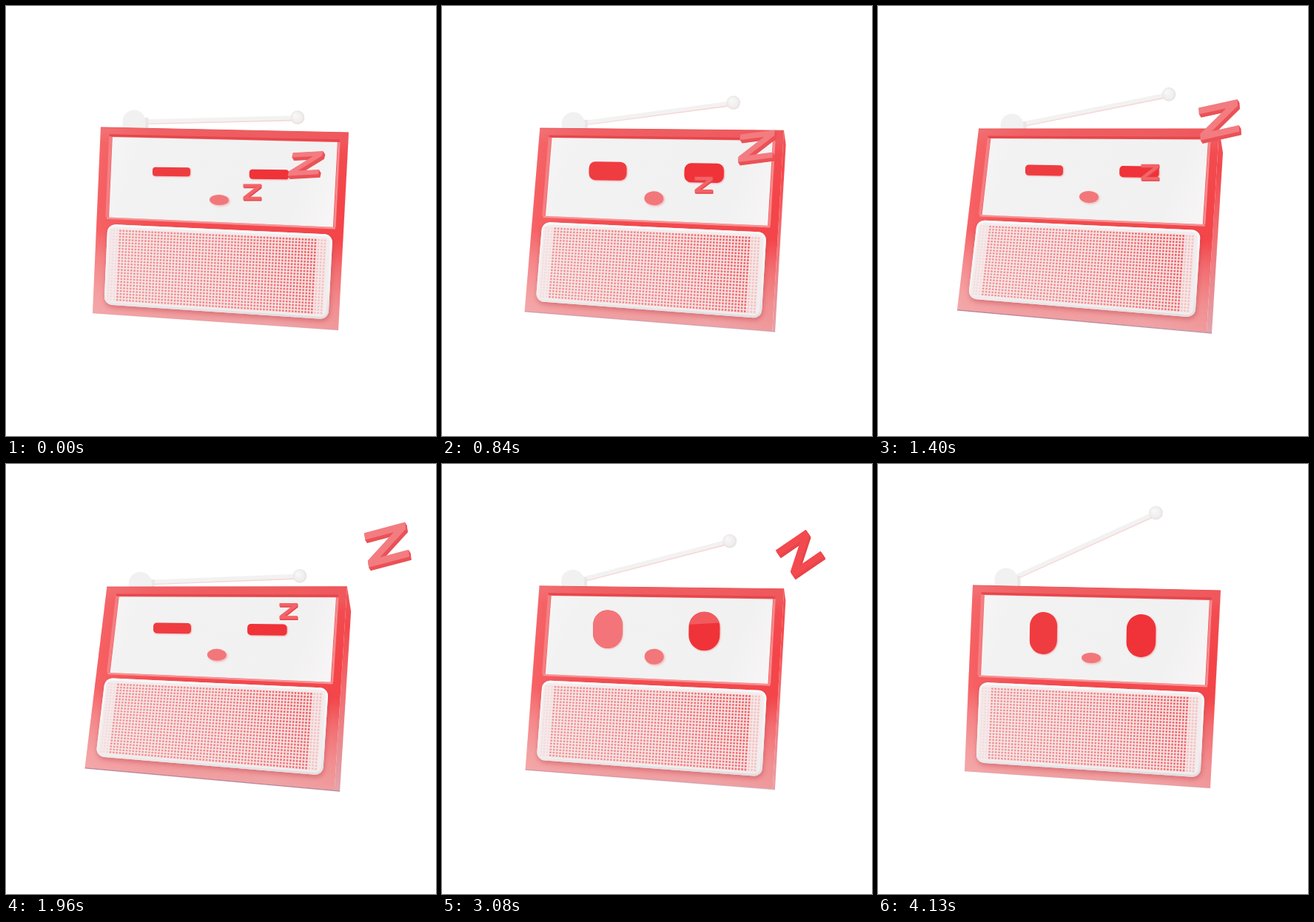
Write an HTML page with a canvas that moves like this. It is 581 by 581 pixels and loops after 4200 ms.

```html
<!DOCTYPE html>
<html lang="en">
<head>
<meta charset="utf-8">
<title>Sleepy radio</title>
<style>
html, body { margin: 0; width: 100%; height: 100%; overflow: hidden; background: #fff; }
canvas { display: block; width: 581px; height: 581px; }
</style>
</head>
<body>
<canvas id="stage" width="581" height="581"></canvas>
<script>
const ctx = document.getElementById('stage').getContext('2d');
const LOOP = 4200, STEP = 70, TURN = 1680;

// Eased key poses: [time, value].
const ANTENNA = [[0, 1.5], [1470, 11.5], [1960, 2.3], [2200, 2.3], [3850, 24.5]];
const OPEN = [[0, 0], [840, .29], [1400, .05], [1960, .05], [3430, 1]];
const NOSE = [[0, 14], [840, 19], [1400, 16], [1960, 16], [2800, 22], [4130, 14]];
const GLARE = [[2660, 0], [3010, 1], [3150, 1], [3430, 0]];

// Front corners TL, TR, BR, BL: at rest and turned.
const REST = [[128, 164], [463, 171], [449, 438], [117, 415]];
const TURNED = [[136, 166], [461, 166], [444, 441], [107, 411]];
const Z = [[0, 0], [1, 0], [1, .2], [.3, .8], [1, .8], [1, 1], [0, 1], [0, .8], [.7, .2], [0, .2]];

const mix = (a, b, k) => a + (b - a) * k;
const mixPoint = (a, b, k) => a.map((v, i) => mix(v, b[i], k));
const clamp = k => Math.max(0, Math.min(1, k));
const ease = k => Math.sin(clamp(k) * Math.PI / 2) ** 2;

function pose(keys, t) {
  let value = keys[0][1];
  for (let i = 1; i < keys.length; i++) {
    const [t0, a] = keys[i - 1], [t1, b] = keys[i];
    if (t >= t0) value = mix(a, b, ease((t - t0) / (t1 - t0)));
  }
  return value;
}

const sway = t => 1.08 * ease(t < TURN ? t / TURN : (LOOP - t) / (LOOP - TURN));

function point(q, u, v) {
  return mixPoint(mixPoint(q[0], q[1], u), mixPoint(q[3], q[2], u), v);
}

function inset(q, u0, v0, u1, v1) {
  return [point(q, u0, v0), point(q, u1, v0), point(q, u1, v1), point(q, u0, v1)];
}

function gradient(x0, y0, x1, y1, ...stops) {
  const g = ctx.createLinearGradient(x0, y0, x1, y1);
  stops.forEach(([k, c]) => g.addColorStop(k, c));
  return g;
}

function poly(pts, fill) {
  ctx.beginPath();
  pts.forEach(p => ctx.lineTo(...p));
  ctx.closePath();
  ctx.fillStyle = fill;
  ctx.fill();
}

function line(a, b, color, width) {
  ctx.beginPath();
  ctx.moveTo(...a);
  ctx.lineTo(...b);
  ctx.strokeStyle = color;
  ctx.lineWidth = width;
  ctx.stroke();
}

function roundQuad(q, r) {
  ctx.beginPath();
  ctx.moveTo(...point(q, .5, 0));
  for (let i = 1; i <= 4; i++) ctx.arcTo(...q[i % 4], ...q[(i + 1) % 4], r);
  ctx.closePath();
}

function shadow(color, blur, x, y) {
  ctx.shadowColor = color;
  ctx.shadowBlur = blur;
  ctx.shadowOffsetX = x;
  ctx.shadowOffsetY = y;
}

function antenna(t, s) {
  const angle = pose(ANTENNA, t) * Math.PI / 180;
  const kx = mix(173, 181, s), ky = mix(156, 161, s), reach = mix(205, 200, s);
  const x = kx + 16, y = mix(156, 159, s) - 5 * ease(t / LOOP) * (1 - s);
  const tx = x + reach * Math.cos(angle), ty = y - reach * Math.sin(angle);
  ctx.lineCap = 'round';
  line([x, y + 1], [tx, ty + 1.5], '#f7d6d6', 6);
  line([x, y], [tx, ty], '#f3f2f2', 5.5);
  ctx.lineCap = 'butt';
  ctx.fillStyle = '#ebe6e6';
  ctx.fillRect(kx + 10, ky - 5, 9.5, 15);
  ctx.fillStyle = '#f2f1f1';
  ctx.beginPath();
  ctx.arc(kx, ky, 15.5, Math.PI, 0);
  ctx.lineTo(kx + 15.5, 172);
  ctx.lineTo(kx - 15.5, 172);
  ctx.fill();
  const ball = ctx.createRadialGradient(tx - 3, ty - 3, 1, tx, ty, 9.5);
  ball.addColorStop(0, '#f8f8f8');
  ball.addColorStop(.7, '#f0eeee');
  ball.addColorStop(1, '#e8dfdf');
  ctx.fillStyle = ball;
  ctx.beginPath();
  ctx.arc(tx, ty, 9.3, 0, 7);
  ctx.fill();
}

function body(q, s) {
  const [, [rx, ry], [bx, by]] = q;
  const corner = [bx + 7 * s, by + s];
  poly([q[1], [rx + 5 * s, ry + 3 + 29 * s], corner, q[2]],
    gradient(0, 165, 0, 442, [0, '#f0575b'], [.2, '#f3484d'], [.55, '#f07276'], [1, '#e4a4ab']));
  poly(q, gradient(0, 164, -12, 440, [0, '#ef5d61'], [.06, '#f24f53'], [.3, '#f4474b'],
    [.48, '#f4494d'], [.62, '#f27477'], [.8, '#f1989a'], [1, '#eeadaf']));
  poly(q, gradient(112, 0, 460, 0, [0, 'rgba(255,190,190,.25)'], [.25, 'rgba(255,150,150,.08)'],
    [.7, 'rgba(245,40,45,0)'], [1, 'rgba(245,40,45,.1)']));
  line(q[0], q[1], '#e9575b', 1);
  line(q[3], corner, `rgba(150,95,130,${clamp(.15 + s * .5)})`, 1.2);
}

function screen(q, s) {
  const f = inset(q, .049 + .006 * s, .05 + .003 * s, .957, .481 - .01 * s);
  line(point(f, -.009, -.02), point(f, -.009, 1), '#f47f82', 4);
  line(point(f, -.014, -.02), point(f, 1.01, -.02), '#e5474c', 3);
  line(point(f, 1.007, 0), point(f, 1.007, 1), '#f58a8d', 3);
  line(point(f, -.01, 1.012), point(f, 1.01, 1.012), '#f69194', 2.5);
  poly(f, gradient(140, 180, 447, 296, [0, '#f7f5f5'], [.15, '#f2f2f2'], [.8, '#f2f1f1'], [1, '#f8f6f6']));
}

function grille(q, s) {
  const du = -.007 * s, dv = -.017 * s;
  const g = inset(q, .045 + du, .518 + dv, .957 + du, .949 + dv);
  const m = inset(q, .091 + du / 2, .542 + dv, .895 + du, .928 + dv);
  ctx.save();
  shadow('rgba(190,60,72,.5)', 7, 1, 3);
  roundQuad(g, 11);
  ctx.fillStyle = '#f1edee';
  ctx.fill();
  ctx.restore();
  ctx.save();
  roundQuad(g, 11);
  ctx.clip();
  ctx.strokeStyle = gradient(0, 295, 0, 422, [0, '#fbfafa'], [.7, '#f3f0f0'], [1, '#e2dbdd']);
  ctx.lineWidth = 6;
  ctx.stroke();
  poly(inset(m, -.042, 0, 0, 1), 'rgba(244,120,125,.15)');
  poly(inset(m, 1, 0, 1.05, 1), 'rgba(244,100,105,.3)');
  poly(m, gradient(390, 300, 190, 410, [0, '#f0656a'], [.4, '#f28387'], [1, '#f29799']));
  const cols = 62, rows = 24;
  for (let c = -3; c <= cols + 3; c++) line(point(m, c / cols, 0), point(m, c / cols, 1), '#f6eaea', 1.6);
  for (let r = 0; r <= rows; r++) line(point(m, -.042, r / rows), point(m, 1.05, r / rows), '#f6eaea', 1.5);
  ctx.restore();
}

function eye(x, y, t, right) {
  const lid = 12 + 45 * pose(OPEN, t), tall = clamp((lid - 25) / 32);
  const w = mix(51, 37, tall) + (right ? 2.5 : 0), h = lid + (right ? 1 : 0);
  const r = mix(h * .32, w / 2, Math.sqrt(tall));
  ctx.save();
  ctx.translate(x, y + 4.5 * ease((t - 3080) / 1050));
  ctx.rotate(.015);
  ctx.beginPath();
  ctx.roundRect(-w / 2, -h / 2, w, h, r);
  shadow('rgba(232,80,85,.4)', 2, 1, 1);
  ctx.fillStyle = right ? '#ef3338' : '#ef3c40';
  ctx.fill();
  shadow('transparent', 0, 0, 0);
  ctx.clip();
  ctx.globalAlpha = pose(GLARE, t);
  const low = right ? -h / 2 + 16 : h;
  poly([[-w, -h], [w, -h], [w, low - 3], [-w, low + 3]], right ? '#f15b5f' : '#f37579');
  ctx.restore();
}

function face(t, s) {
  eye(mix(223.5, 224.5, s), mix(224, 222, s), t, false);
  eye(mix(355.5, 353, s), mix(227.5, 224, s), t, true);
  ctx.save();
  shadow('rgba(235,110,112,.45)', 3, 1.5, 1.5);
  ctx.fillStyle = '#f2777a';
  ctx.beginPath();
  ctx.ellipse(mix(288, 285, s), mix(262, 258, s), 13, pose(NOSE, t) / 2, .03, 0, 7);
  ctx.fill();
  ctx.restore();
}

// tilt turns the bars, lean turns the upright direction
function letter(x, y, w, h, tilt, lean, depth, front, back) {
  const bar = [w * Math.cos(tilt), -w * Math.sin(tilt)];
  const down = [h * Math.sin(lean), h * Math.cos(lean)];
  const shape = d => Z.map(([u, v]) => [
    x + d * .6 + (u - .5) * bar[0] + (v - .5) * down[0],
    y + d + (u - .5) * bar[1] + (v - .5) * down[1]]);
  for (let d = depth / 2; d > -depth / 2; d -= .5) poly(shape(d), back);
  poly(shape(-depth / 2), front);
}

function smallZ(t) {
  const sec = t / 1000, grow = Math.max(0, (t - 1960) / 1120), rush = Math.max(0, sec - 2.52);
  const x = 333 + 25 * sec + 238 * rush ** 2, y = 252 - 13.65 * sec ** 2;
  const size = 1 + 1.05 * grow, turn = .6 * grow ** 1.5, k = clamp(grow);
  letter(x, y, 24 * size, 21.5 * size, turn, turn, 1.5 + 2 * k,
    `rgb(242,${mix(100, 74, k)},${mix(104, 78, k)})`, '#e8454b');
}

function bigZ(t) {
  const sec = t / 1000, k = ease(t / 2000);
  const x = 406 + 28.6 * sec ** 2, y = 215 - 107 * (Math.hypot(sec, 1.5) - 1.5);
  letter(x, y, mix(41, 57, k), mix(32, 47, k), mix(.05, .26, k), mix(-.22, .13, k), 4.5, '#f37c80', '#ea5257');
}

function draw(t) {
  const s = sway(t), front = REST.map((p, i) => mixPoint(p, TURNED[i], s));
  ctx.fillStyle = '#fff';
  ctx.fillRect(0, 0, 581, 581);
  antenna(t, s);
  body(front, s);
  screen(front, s);
  grille(front, s);
  face(t, s);
  smallZ(t);
  bigZ(t);
}

const start = performance.now();
function tick() {
  const t = (performance.now() - start) % LOOP;
  draw(Math.floor(t / STEP) * STEP);
  requestAnimationFrame(tick);
}
tick();
</script>
</body>
</html>
```
